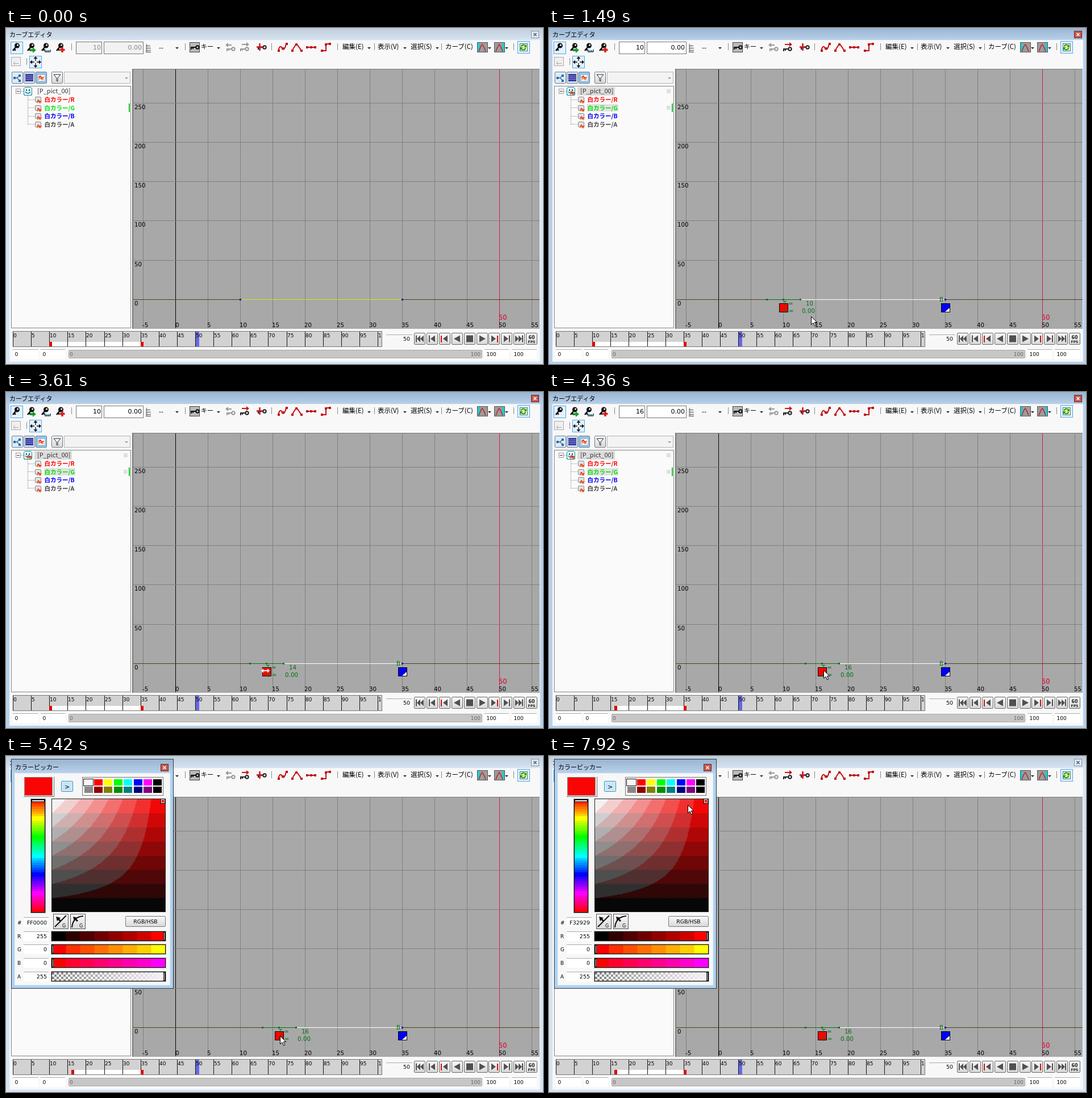
Animation, 945 px wide and 592 px high, one loop 7990 ms. Source, as an HTML page:

```html
<!DOCTYPE html>
<html lang="ja">
<head>
<meta charset="utf-8">
<title>カーブエディタ</title>
<style>
html, body { margin: 0; width: 100%; height: 100%; overflow: hidden; background: #f8f8f8; }
svg { display: block; }
text { font-family: "DejaVu Sans", "Noto Sans CJK JP", sans-serif; white-space: pre; }
text.jp { font-family: "Noto Sans CJK JP", "Noto Sans CJK", sans-serif; }
rect { shape-rendering: crispEdges; }
</style>
</head>
<body>
<svg id="stage" width="945" height="592" viewBox="0 0 945 592">
  <defs>
    <pattern id="checker" width="8" height="8" patternUnits="userSpaceOnUse" x="81" y="381">
      <path d="M0 0h8v8h-8z" fill="#fff"/><path d="M0 0h4v8h4v-4h-8z" fill="#858585"/>
    </pattern>
  </defs>
</svg>
<script>
const LOOP = 7990;
const stage = document.getElementById('stage');
const defs = stage.querySelector('defs');

function add(parent, tag, attrs = {}, content) {
  const node = document.createElementNS('http://www.w3.org/2000/svg', tag);
  for (const k in attrs) node.setAttribute(k, attrs[k]);
  if (content !== undefined) node.textContent = content;
  parent.append(node);
  return node;
}
const group = (p, x = 0, y = 0) => add(p, 'g', { transform: `translate(${x} ${y})` });
const box = (p, x, y, width, height, fill, stroke, rx = 0) => add(p, 'rect', stroke
  ? { x: x + .5, y: y + .5, width: width - 1, height: height - 1, fill, stroke, rx }
  : { x, y, width, height, fill, rx });
const shape = (p, d, fill) => add(p, 'path', { d, fill });
const line = (p, d, stroke, w = 1) =>
  add(p, 'path', { d, stroke, fill: 'none', 'stroke-width': w });
const label = (p, x, y, s, size = 9.5, fill = '#000', more = {}) =>
  add(p, 'text', { x, y, 'font-size': size, fill, ...more }, s);
const jp = (p, x, y, s, size = 11, fill = '#000', more = {}) =>
  label(p, x, y, s, size, fill, { class: 'jp', ...more });
const END = { 'text-anchor': 'end' };
const show = (node, on) => node.setAttribute('display', on ? 'inline' : 'none');
const move = (node, x, y) => node.setAttribute('transform', `translate(${x} ${y})`);

function gradient(id, colors, vertical) {
  const g = add(defs, 'linearGradient', { id, x2: vertical ? 0 : 1, y2: vertical ? 1 : 0 });
  colors.forEach((c, i) =>
    add(g, 'stop', { offset: i / (colors.length - 1), 'stop-color': c }));
  return `url(#${id})`;
}
// Reduces every channel to eight levels between lo and hi
function banding(id, lo, hi) {
  const filter = add(defs, 'filter',
    { id, x: 0, y: 0, width: 1, height: 1, 'color-interpolation-filters': 'sRGB' });
  const levels = [...Array(8)].map((_, i) => i ? i < 7 ? (i + .5) / 8 : hi : lo).join(' ');
  const transfer = add(filter, 'feComponentTransfer');
  for (const c of 'RGB') add(transfer, 'feFunc' + c, { type: 'discrete', tableValues: levels });
  return `url(#${id})`;
}
const vividBands = banding('vividBands', 0, 1);
const softBands = banding('softBands', .03, .95);
const activeBar = gradient('activeBar', ['#99b4d1', '#b9d1ea'], true);
const idleBar = gradient('idleBar', ['#bfcddb', '#d7e4f2'], true);
const buttonFill = gradient('buttonFill', ['#fafafa', '#d8d8d8'], true);

function closeButton(p, x, y, active) {
  box(p, x, y, 14, 13, active ? '#c9564c' : '#dfe8f2', active ? '#5e2a2a' : '#8593a5', 1);
  line(p, `M${x + 4.5} ${y + 4}l5 5m0-5l-5 5`, active ? '#fff' : '#56606e', 1.6);
}

// Main window frame
function frame(bar, body, active) {
  const g = group(stage);
  box(g, 0, 0, 945, 592, body);
  box(g, 0, 0, 945, 22, bar);
  closeButton(g, 924, 5, active);
  return g;
}
frame(idleBar, '#d7e4f2', false);
const activeFrame = frame(activeBar, '#b9d1ea', true);
const ui = group(stage);
box(ui, 6, 21, 934, 567, '#f8f8f8', '#eef3f9');
jp(ui, 6, 15.5, 'カーブエディタ');

// Toolbar
const separator = (x, y = 27) => box(ui, x, y, 1, 12, '#888');
const arrowDown = (x, y = 34, c = '#222') => shape(ui, `M${x - 3} ${y}h6l-3 3z`, c);
const selected = (x, y) => box(ui, x, y, 22, 22, '#e4f1fc', '#55a4e4');

function slantKey(x, y) {
  const g = group(ui, x, y);
  add(g, 'circle', { cx: 2.5, cy: -3, r: 4.5, fill: '#111' });
  add(g, 'circle', { cx: 3.6, cy: -4, r: 1.5, fill: '#fff' });
  line(g, 'M0 0L-5 6M-3 3l3 2.5', '#111', 2.6);
  return g;
}
function flatKey(p, x, y, c) {
  const g = group(p, x, y);
  add(g, 'circle', { cx: 5, cy: 0, r: 2.7, fill: 'none', stroke: c, 'stroke-width': 2 });
  line(g, 'M2 0h-9M-6 0v4M-3 0v3', c, 2);
  return g;
}
selected(8, 24);
slantKey(17, 34);
shape(slantKey(43, 34), 'M-1 3h5v-3l6 5-6 5v-3h-5z', '#1f9a2c');
line(slantKey(68, 34), 'M0 8h10M1 8v-4M4 8v-3M7 8v-3M10 8v-4', '#164f68', 1.6);
line(slantKey(94, 34), 'M5 0v9M.5 4.5h9', '#d8201c', 3.5);
[115, 315, 467, 583, 648, 766, 893].forEach(x => separator(x));
separator(36, 53);

const fields = [[123, 46], [172, 70]].map(([x, w]) => box(ui, x, 24, w, 22, '#f2f2f2', '#777'));
const fieldTexts = [[167, '10'], [239, '0.00']].map(([x, s]) => label(ui, x, 38, s, 11, '#888', END));
line(ui, 'M247.500 28v14M246 31.500h8M246 35.500h9M246 39.500h9M246 42.500h9', '#777', 1.3);
label(ui, 269, 38, '--', 11);
[301, 374, 639, 702, 759, 851, 881].forEach(x => arrowDown(x));
box(ui, 323, 25, 18, 18, '#bbb', '#444');
flatKey(ui, 332, 34, '#111');
jp(ui, 343, 37, 'キー');

function arrowKey(p, x, dark, dir) {
  const arrow = dark ? '#c4161c' : '#999';
  flatKey(p, x, 37, dark ? '#222' : '#999');
  shape(p, dir < 0 ? `M${x - 9} 30l5-4v3h6v2h-6v3z` : `M${x + 9} 29l-5-4v3h-8v2h8v3z`, arrow);
}
arrowKey(ui, 395, false, -1);
const keyIdle = group(ui), keyReady = group(ui);
arrowKey(keyIdle, 419, false, 1);
arrowKey(keyReady, 419, true, 1);
flatKey(ui, 450, 34, '#222');
line(ui, 'M446.500 27v13M441 33.500h11', '#c4161c', 2.5);

const red = '#c01018';
line(ui, 'M479 41c2-10 5-10 7-5s6-1 7-9', red, 2);
line(ui, 'M504 41c1-7 4-8 7.500-13c3 5 6 6 8 13', red, 2);
line(ui, 'M529 34h17', red, 2);
line(ui, 'M555 40h8v-12h8', red, 2);
[[478, 38], [485, 34], [492, 26], [502, 38], [509, 27], [518, 38], [528, 32], [535, 32],
 [542, 32], [554, 38], [561, 27], [568, 26]].forEach(([x, y]) => box(ui, x, y, 4, 4, red));
['編集(E)', '表示(V)', '選択(S)', 'カーブ(C)'].forEach((s, i) =>
  jp(ui, [592, 654, 712, 773][i], 36.500, s, 11.5));
for (const x of [829, 859]) {
  box(ui, x, 25, 19, 18, '#9c9c9c', '#555');
  box(ui, x + (x === 829 ? 1 : 14), 26, 4, 16, '#27c8ce');
  line(ui, `M${x + 3} 41c2-4 3-9 6-12c3 3 4 8 6 12`, '#c4242c', 1.6);
}
selected(900, 23);
box(ui, 904, 27, 14, 14, '#fff6a0', '#3a7ab0');
line(ui, 'M907 33c0-4 5-4 7-2m0 4c0 4-5 4-7 2', '#1b9a2b', 2);
shape(ui, 'M916 29v5h-5zM905 39v-5h5z', '#1b9a2b');
box(ui, 9, 51, 17, 16, '#f0f0f0', '#aaa');
line(ui, 'M13 62.500h9M13 62l3-3m-3 3l3 3', '#aaa');
selected(41, 49);
line(ui, 'M52 52v16M44 60h16', '#111', 1.4);
shape(ui, 'M52 50l3.500 4h-7zM52 70l3.500-4h-7zM42 60l4-3.500v7zM62 60l-4-3.500v7z', '#111');
box(ui, 50, 58, 4, 4, '#fff');

// Tree panel
[[10, '#dcebf7'], [31, '#cfe0f0'], [52, '#8fc6ee'], [80, buttonFill]].forEach(([x, fill]) =>
  box(ui, x, 77, 20, 21, fill, '#6c7c8c', 2));
line(ui, 'M14 88h5M19 88l5-4M19 88l5 4', '#2b6ca8', 1.4);
[[13, 86], [22, 82], [22, 91]].forEach(([x, y]) => box(ui, x, y, 4, 4, '#2b6ca8'));
box(ui, 34, 81, 14, 13, '#3b3b9d');
line(ui, 'M34 84.500h14M34 87.500h14M34 90.500h14', '#8c8cd8');
box(ui, 56, 82, 13, 12, '#fff', '#bbb', 2);

function wave(p, x, y, s = 1) {
  const g = add(p, 'g', { transform: `translate(${x} ${y}) scale(${s})` });
  line(g, 'M-4 1c2-5 3-3 4-1s3 2 4-1', '#e02818', 2);
  line(g, 'M-4 4c2-4 3-2 4-1s3 2 4-1', '#f07820', 1.6);
}
wave(ui, 62, 87);
shape(ui, 'M84 82h12l-5 6v6l-2-1v-5z', '#fff').setAttribute('stroke', '#222');
box(ui, 102, 77, 117, 21, '#f3f3f3', '#b4b4b4');
arrowDown(212, 87, '#999');
box(ui, 9, 102, 211, 427, '#fafafa', '#858585');
const treeMarks = group(ui);
box(treeMarks, 50, 104, 66, 15, '#dcdcdc');
box(treeMarks, 67, 134, 55, 13, '#e2e2e2');
box(treeMarks, 207, 108, 7, 7, '#e0e0e0');
box(treeMarks, 207, 137, 7, 7, '#e0e0e0');
add(ui, 'path', { d: 'M38.500 119v51M26 111.500h5' + [126.5, 140.5, 155.5, 169.5].map(y => `M39 ${y}h11`).join(''),
  stroke: '#888', 'stroke-dasharray': '1 1', fill: 'none' });
box(ui, 17, 107, 9, 9, '#fff', '#999');
box(ui, 19, 111, 5, 1, '#333');
box(ui, 31, 104, 15, 15, '#e8fafa', '#1688a0', 3);
box(ui, 35, 108, 2, 3, '#0c6a80');
box(ui, 40, 108, 2, 3, '#0c6a80');
line(ui, 'M34 112.500q4.500 5 9 0', '#0c6a80', 1.4);
const rootWave = group(ui);
wave(rootWave, 41, 114, .9);
jp(ui, 55, 115, '[P_pict_00]', 11, '#333', { 'font-weight': 500 });
[['R', '#f00'], ['G', '#00e000'], ['B', '#0000f0'], ['A', '#444']].forEach(([c, fill], i) => {
  const y = 130 + i * 14.6;
  box(ui, 51, Math.round(y) - 9, 11, 10, '#e2e2e2', '#888', 2);
  wave(ui, 58.5, y - 1, .85);
  jp(ui, 67.5, y, '白カラー/' + c, 10.5, fill, { 'font-weight': 700 });
});
box(ui, 216, 133, 2, 15, '#00c81e');

// Graph
const frameX = f => 298 + f * 11.4;
box(ui, 222, 72, 717, 458, '#a8a8a8');
box(ui, 222, 72, 717, 1, '#777');
box(ui, 222, 72, 2, 458, '#777');
for (let f = -5; f <= 55; f += 5) {
  const x = Math.round(frameX(f));
  box(ui, x, 73, 1, 456, f === 0 ? '#000' : f === 50 ? '#c4204c' : '#808080');
  label(ui, x - 1 + (f === 0), 527, f, 10.3);
}
for (let v = 0; v <= 250; v += 50) {
  const y = Math.round(478 - v * 1.386);
  box(ui, 224, y, 715, 1, v ? '#808080' : '#45451c');
  label(ui, 226, y + 10.5, v, 10.3);
}
label(ui, 867, 514, '50', 11.5, '#d8002c');

const plain = group(ui);
box(plain, 412, 478, 286, 1, '#c4f000');
box(plain, 411, 477, 3, 3, '#0000a0');
const chosen = group(ui);
const span = box(chosen, 412, 478, 286, 1, '#fff');
const knob = group(chosen);
const green = '#007414';
box(knob, -7, 7, 16, 16, '#f00', '#000');
box(knob, -29, 0, 59, 1, green);
[-30, -1, 29].forEach(x => box(knob, x, -1, 3, 3, green));
label(knob, 0, 11, 'T =', 10, green);
label(knob, 0, 24, 'V =', 10, green);
const knobFrame = label(knob, 53, 11, '10', 10.3, green, END);
label(knob, 56, 24, '0.00', 10.3, green, END);
box(chosen, 690, 485, 16, 16, '#0000f0', '#000');
shape(chosen, 'M705 493v7h-8z', '#fff');
label(chosen, 687, 482, 'B', 10, green);
box(ui, 696, 477, 3, 3, '#0000a0');

// Timeline
const timeX = f => Math.round(12 + f * 6.42);
box(ui, 12, 534, 650, 28, '#d2d2d2', '#777');
const keyedSpan = box(ui, 76, 553, 162, 8, '#fff');
box(ui, 333, 535, 7, 26, '#6868e8');
for (let f = 0; f <= 100; f += 5) {
  box(ui, timeX(f), 535, 1, 26, '#111');
  label(ui, timeX(f) + 1, 545, f < 100 ? f : '1', 9);
}
const startMark = box(ui, 76, 553, 5, 8, '#e00000');
box(ui, 237, 553, 5, 8, '#e00000');
box(ui, 669, 540, 46, 1, '#aaa');
label(ui, 699, 551, '50', 9.5);

const transport = [
  'M-7-6h2v12h-2zM1-6v12l-6-6zM7-6v12l-6-6z',
  'M-6-6h2v12h-2zM5-6v12l-8-6z',
  'M5-6v12l-8-6z',
  'M5-6v12l-11-6z',
  'M-6-6h12v12h-12z'
];
for (let i = 0; i < 10; i++) {
  const g = group(ui, Math.round(728 + i * 21.9), 547.5);
  add(g, 'rect', { x: -9.5, y: -10, width: 19, height: 20, rx: 2, fill: buttonFill, stroke: '#666' });
  if (i === 9) {
    label(g, 0, 0, '60', 8, '#222', { 'text-anchor': 'middle', 'font-weight': 700 });
    label(g, 0, 7, 'FPS', 6, '#222', { 'text-anchor': 'middle', 'font-weight': 700 });
    continue;
  }
  const mirror = i > 4;
  const icon = add(g, 'g', { transform: `scale(${mirror ? -1 : 1} 1)` });
  shape(icon, transport[mirror ? 8 - i : i], '#505050');
  if (i === 2 || i === 6) box(icon, -7, -6, 2, 12, '#d01010');
}
[[12, 45], [61, 43], [842, 43], [890, 44]].forEach(([x, w], i) => {
  box(ui, x, 566, w, 17, '#fff');
  box(ui, x, 566, w, 1, '#aaa');
  label(ui, x + 3.500, 577.5, i < 2 ? '0' : '100', 9);
});
box(ui, 110, 567, 728, 15, '#c6c6c6', '#aaa', 2);
label(ui, 112, 578, '0', 9, '#666');
label(ui, 835, 578, '100', 9, '#666', END);

const band = add(stage, 'rect', { fill: 'none', stroke: '#333', x: 380.5, y: 455.5 });

// Colour picker
const picker = group(stage);
box(picker, 9, 5, 286, 405, '#b0d2ee', '#2c3744');
box(picker, 10, 6, 284, 24, activeBar);
box(picker, 15, 30, 274, 374, '#f7f7f7', '#e4edf6');
jp(picker, 16, 24, 'カラーピッカー');
closeButton(picker, 272, 14, true);
box(picker, 31, 36, 54, 36, '#fff');
line(picker, 'M31 71.500h53.500v-35', '#666');
box(picker, 32, 37, 50, 33, '#fa0505', '#888');
box(picker, 97, 44, 21, 19, '#eaf6fd', '#2c86c0', 2);
const glow = box(picker, 99, 46, 17, 15, '#c4e5f6');
label(picker, 103, 58, '>', 11);
box(picker, 134, 37, 143, 33, '#f7f7f7', '#777');
const swatches = ['#f7f7f7', '#f00', '#ff0', '#0f0', '#0ff', '#00f', '#f0f', '#000',
  '#888', '#900000', '#808000', '#009000', '#008080', '#000080', '#800080', '#000'];
swatches.forEach((c, i) =>
  box(picker, Math.round(137.6 + i % 8 * 17.4), i < 8 ? 41 : 54, 15, 11, c));
box(picker, 136, 40, 18, 13, 'none', '#111');

box(picker, 43, 75, 27, 202, '#fff', '#999');
const hue = gradient('hue', ['#f00', '#ff0', '#0f0', '#0ff', '#00f', '#f0f', '#f00'], true);
box(picker, 45, 77, 23, 198, hue).setAttribute('filter', vividBands);
box(picker, 44, 76, 25, 200, 'none', '#000');
box(picker, 45, 77, 23, 4, '#fff', '#000');
const tone = add(picker, 'g', { filter: softBands });
box(tone, 81, 76, 199, 199, gradient('tint', ['#fff', '#f00']));
box(tone, 81, 76, 199, 199, gradient('shade', ['#0000', '#000'], true));
box(picker, 80, 75, 201, 200, 'none', '#222');
box(picker, 272, 75, 8, 9, 'none', '#000');
box(picker, 273, 76, 6, 7, 'none', '#fff');

for (const x of [83, 113]) {
  box(picker, x, 278, 27, 27, buttonFill, '#555');
  line(picker, x === 83 ? 'M86 301L106 281' : 'M116 302c1-12 7-19 20-20', '#111', 2);
  shape(picker, `M${x + 5} 283l8 2-2 2 3 3-2 2-3-3-2 2z`, '#111');
  label(picker, x + 16, 302, 'G', 8, '#111');
}
box(picker, 210, 282, 71, 19, buttonFill, '#777', 2);
label(picker, 245.5, 295, 'RGB/HSB', 9.3, '#000', { 'text-anchor': 'middle' });

const input = y => {
  box(picker, 31, y, 44, 17, '#fff');
  box(picker, 31, y, 44, 1, '#aaa');
};
input(284);
label(picker, 20, 297, '#', 9);
const hex = label(picker, 72, 297, 'FF0000', 9.5, '#000', END);
[['R', 255, ['#000', '#f00']], ['G', 0, ['#f00', '#ff0']], ['B', 0, ['#f00', '#f0f']],
 ['A', 255, ['#f4f1f400', '#f4f1f4']]].forEach(([name, value, colors], i) => {
  const y = 309 + i * 23.8 | 0;
  input(y);
  label(picker, 20, y + 11.5, name, 9);
  label(picker, 72, y + 12, value, 9.5, '#000', END);
  box(picker, 79, y - 1, 203, 19, '#fff', '#aaa');
  box(picker, 80, y, 201, 17, '#fff', '#111');
  if (name === 'A') box(picker, 81, y + 1, 199, 15, 'url(#checker)');
  const bar = box(picker, 81, y + 1, 199, 15, gradient('bar' + name, colors));
  if (name !== 'A') bar.setAttribute('filter', vividBands);
  box(picker, value ? 277 : 81, y + 1, 3, 15, '#fff', '#000');
});

// Pointers
const pointer = group(stage);
const arrow = shape(pointer, 'M.5.5v14l3.500-3 2.500 5.500 2.300-1-2.500-5.500h4.500z', '#fff');
arrow.setAttribute('stroke', '#000');
const resize = group(stage);
shape(resize, 'M-8 0l4-4v3h7v-3l4 4-4 4v-3h-7v3z', '#fff');

// Pointer paths: start, end, number of positions, points on the way
const moves = [
  [290, 740, 7, [565, 563], [460, 480], [380, 454]],
  [890, 1190, 5, [380, 455], [424, 487], [461, 508]],
  [2030, 2330, 5, [452, 506], [408, 497]],
  [2470, 2620, 3, [408, 495], [409, 491]],
  [4290, 4740, 7, [481, 489], [486, 492], [483, 496]],
  [4970, 5120, 3, [483, 495], [482, 493]],
  [5850, 6340, 8, [468, 475], [262, 229], [237, 178]],
  [6560, 6840, 5, [237, 167], [238, 135], [248, 84]],
  [6910, 7200, 5, [247, 76], [237, 48]],
  [7340, 7560, 4, [237, 55], [244, 86]]
];
const dragged = [[0, 10], [3160, 11], [3460, 12], [3610, 14], [3680, 15], [3825, 16]];

function pointerAt(t) {
  const seg = moves.filter(m => m[0] <= t).pop();
  if (!seg) return null;
  const [start, end, count, ...pts] = seg;
  const step = Math.min(count - 1, Math.floor((t - start) / (end - start) * (count - 1) + .1));
  const along = step / (count - 1) * (pts.length - 1);
  const i = Math.min(pts.length - 2, Math.floor(along)), f = along - i;
  return [0, 1].map(k => Math.round(pts[i][k] + (pts[i + 1][k] - pts[i][k]) * f));
}

function draw(t) {
  const picked = t >= 1490, dragging = t >= 3160 && t < 4290;
  const open = t >= 5420;
  const value = dragged.filter(d => d[0] <= t).pop()[1];
  const committed = t < 4290 ? 10 : 16;
  const x = Math.round(frameX(value)), at = pointerAt(t);

  show(activeFrame, t >= 890 && !open);
  [chosen, keyReady, treeMarks, rootWave].forEach(n => show(n, picked));
  [plain, keyIdle].forEach(n => show(n, !picked));
  fields.forEach(n => n.setAttribute('fill', picked ? '#fff' : '#f2f2f2'));
  fieldTexts.forEach(n => n.setAttribute('fill', picked ? '#000' : '#888'));
  fieldTexts[0].textContent = committed;

  move(knob, x, 478);
  knobFrame.textContent = value;
  span.setAttribute('x', x);
  span.setAttribute('width', 698 - x);
  startMark.setAttribute('x', timeX(committed));
  keyedSpan.setAttribute('x', timeX(committed));
  keyedSpan.setAttribute('width', 238 - timeX(committed));

  show(band, t >= 890 && !picked);
  if (at) {
    move(pointer, ...at);
    band.setAttribute('width', Math.max(0, at[0] - 380));
    band.setAttribute('height', Math.max(0, at[1] - 455));
  }
  show(pointer, at && !dragging);
  show(resize, dragging);
  move(resize, x - 1, 491);

  show(picker, open);
  glow.setAttribute('opacity', .85 + .15 * Math.cos((t - 5420) / 330));
  hex.textContent = t >= 7920 ? 'F32929' : 'FF0000';
}

const begin = performance.now();
function tick() {
  draw((performance.now() - begin) % LOOP);
  requestAnimationFrame(tick);
}
tick();
</script>
</body>
</html>
```
